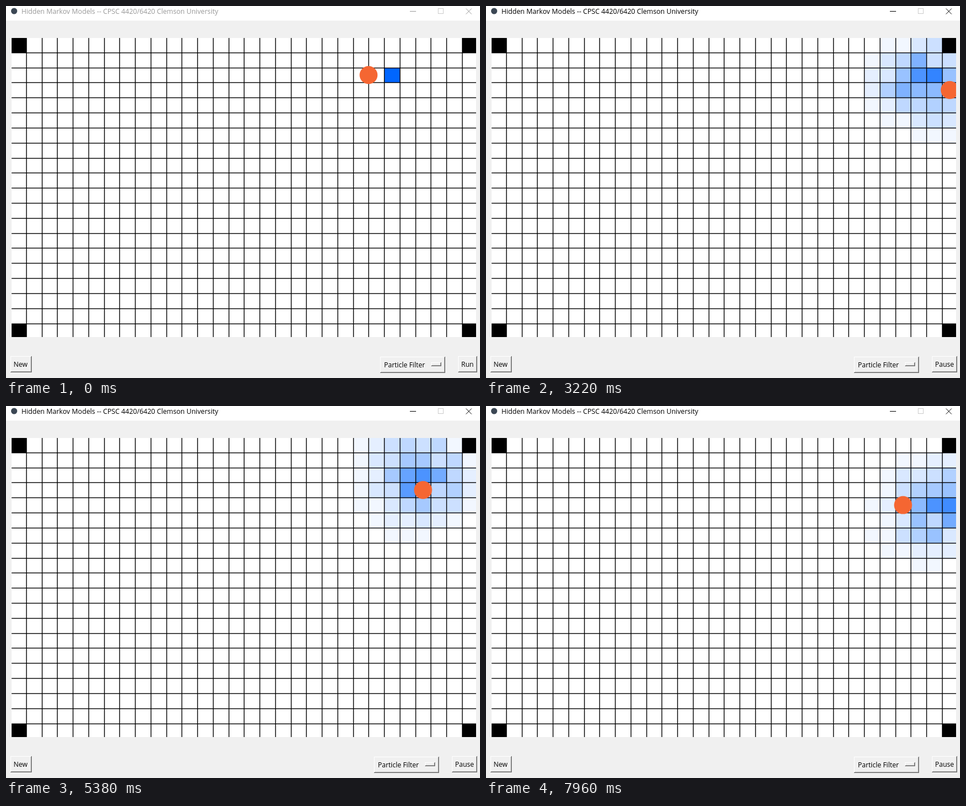
An HTML page with a canvas that plays this animation: 845 by 663 pixels, repeating every 8000 ms.

```html
<!DOCTYPE html>
<html lang="en">
<head>
<meta charset="utf-8">
<title>Hidden Markov Models</title>
<style>
  html, body { margin: 0; width: 100%; height: 100%; overflow: hidden; background: #f0f0f0; }
  canvas { display: block; }
</style>
</head>
<body>
<canvas id="stage" width="845" height="663"></canvas>
<script>
const ctx = document.getElementById('stage').getContext('2d');
const LOOP = 8000, COLS = 30, ROWS = 20, START = 300;
const FONT = '"Open Sans", "Noto Sans", sans-serif';

// Time, then tracker and cloud centre in grid units
const path = [
  { t: START, tracker: [23, 2.5], cloud: [24, 2] },
  { t: 1300, tracker: [24, 2.5], cloud: [23.5, 2.6] },
  { t: 2450, tracker: [29.5, 1.5], cloud: [27, .7] },
  { t: 3220, tracker: [29.5, 3.5], cloud: [27.6, 2.4] },
  { t: 4460, tracker: [27.5, 3.5], cloud: [26.7, 1.8] },
  { t: 5060, tracker: [25.5, 3.5], cloud: [25, 2.5] },
  { t: 6230, tracker: [29.5, 3.5], cloud: [27.6, 1.5] },
  { t: 7930, tracker: [26.5, 4.5], cloud: [28.1, 4.1] }
];

// The picture changes only at these moments: bursts of one second with uneven gaps
const ticks = [0];
for (let burst = 0; burst < 8; burst++) {
  const n = burst < 2 ? 12 : 10;
  let t = 140 + 1080 * burst;
  for (let i = 0; i < n; i++) {
    ticks.push(t);
    t += n === 12 ? (i % 5 === 4 ? 140 : 80) : (i % 2 ? 80 : 150);
  }
}

const clamp = v => Math.max(0, Math.min(1, v));
const mix = (a, b, p) => a.map((v, i) => v + (b[i] - v) * p);
const gridX = c => 35.85 + 27.75 * (c - 1);
const gridY = r => 82.7 + 26.83 * (r - 1);
const edgeX = c => c === 0 ? 10 : Math.min(838, Math.round(gridX(c)));
const edgeY = r => r === 0 ? 57 : Math.min(590, Math.round(gridY(r)));

function random(a, b, c) {
  const s = Math.sin(a * 12.99 + b * 78.23 + c * 37.72) * 43758.55;
  return s - Math.floor(s);
}

function rect(x, y, w, h, color) {
  ctx.fillStyle = color;
  ctx.fillRect(x, y, w, h);
}

function disc(x, y, r, color) {
  ctx.fillStyle = color;
  ctx.beginPath();
  ctx.arc(x, y, r, 0, 2 * Math.PI);
  ctx.fill();
}

function text(s, x, y, size, color) {
  ctx.font = `${size}px ${FONT}`;
  ctx.fillStyle = color;
  ctx.fillText(s, x, y);
}

function cell(c, r, color) {
  const x = edgeX(c), y = edgeY(r);
  rect(x, y, edgeX(c + 1) - x, edgeY(r + 1) - y, color);
}

// A bell-shaped cloud that spreads from one cell, with uneven cell counts
function drawCloud([cx, cy], t, tick) {
  const spread = Math.max(.15, Math.sqrt(clamp((t - START) / 1000)));
  const level = Math.min(1, .6 / spread ** 2);
  for (let c = 0; c < COLS; c++) {
    for (let r = 0; r < ROWS; r++) {
      const d = ((c - cx) / 1.75) ** 2 + ((r - cy) / 1.6) ** 2;
      const uneven = 1 + spread * (random(c, r, tick) - .5);
      const v = level * uneven * Math.exp(-d / 2 / spread ** 2);
      const shade = Math.min(1, Math.round(v * 20) / 20);
      if (shade) cell(c, r, `rgba(0,102,255,${shade})`);
    }
  }
}

function drawBoard(t, tick) {
  let i = 0;
  while (i < path.length - 2 && path[i + 1].t <= t) i++;
  const a = path[i], b = path[i + 1];
  const p = clamp((t - a.t) / (b.t - a.t));

  ctx.save();
  ctx.beginPath();
  ctx.rect(10, 57, 828, 533);
  ctx.clip();
  rect(10, 57, 828, 533, '#fff');
  drawCloud(mix(a.cloud, b.cloud, p), t, tick);
  for (let c = 1; c < COLS; c++) rect(edgeX(c) - .2, 57, 1.4, 533, '#000');
  for (let r = 1; r < ROWS; r++) rect(10, edgeY(r) - .2, 828, 1.4, '#000');
  for (const c of [0, COLS - 1]) for (const r of [0, ROWS - 1]) cell(c, r, '#000');
  const [x, y] = mix(a.tracker, b.tracker, p).map(v => Math.round(v * 2) / 2);
  disc(gridX(x), gridY(y), 16, '#f56632');
  ctx.restore();
}

function raised(x, y, w, h) {
  rect(x, y, w, h, '#696969');
  rect(x, y, w - 1, h - 1, '#fff');
  rect(x + 1, y + 1, w - 2, h - 2, '#a0a0a0');
  rect(x + 1, y + 1, w - 3, h - 3, '#f0f0f0');
}

function button(label, x, w) {
  raised(x, 624, w, 29);
  text(label, x + 5.5, 643, 12, '#000');
}

function drawTitle(active) {
  const ink = active ? '#000' : '#999';
  rect(0, 0, 845, 26, '#fff');
  disc(14.5, 9, 5.5, '#3b4754');
  text('Hidden Markov Models -- CPSC 4420/6420 Clemson University', 27.5, 14, 12.2, ink);
  rect(720, 9, 11, 1, ink);
  ctx.lineWidth = 1;
  ctx.strokeStyle = '#ccc';
  ctx.strokeRect(770.5, 4.5, 9, 9);
  ctx.strokeStyle = ink;
  ctx.beginPath();
  ctx.moveTo(820, 4.5);
  ctx.lineTo(830, 14.5);
  ctx.moveTo(830, 4.5);
  ctx.lineTo(820, 14.5);
  ctx.stroke();
}

function drawControls(running) {
  const x = running ? 656 : 667;
  button('New', 8, 38);
  raised(x, 625, 116, 29);
  text('Particle Filter', x + 7, 644, 12, '#000');
  raised(x + 91, 635, 18, 7);
  if (running) button('Pause', 795, 45);
  else button('Run', 806, 34);
}

function drawCursor(t) {
  if (t < 140 || t >= 1530) return;
  const [x, y] = t < 1220 ? mix([823, 638], [552, 494], clamp((t - 700) / 450)) : [517, 368];
  ctx.save();
  ctx.translate(Math.round(x) + .5, Math.round(y) + .5);
  ctx.beginPath();
  for (const [px, py] of [[0, 0], [0, 14], [3, 11], [5, 16], [7, 15], [5, 10], [9, 10]]) ctx.lineTo(px, py);
  ctx.closePath();
  ctx.fillStyle = '#fff';
  ctx.fill();
  ctx.strokeStyle = '#000';
  ctx.lineWidth = 1;
  ctx.stroke();
  ctx.restore();
}

function draw(time) {
  const tick = ticks.findLastIndex(t => t <= time);
  const t = ticks[tick];
  rect(0, 0, 845, 663, '#f0f0f0');
  drawTitle(t > 0);
  drawBoard(t, tick);
  drawControls(t >= START);
  drawCursor(t);
}

const begin = performance.now();
function frame() {
  draw((performance.now() - begin) % LOOP);
  requestAnimationFrame(frame);
}
frame();
</script>
</body>
</html>
```
